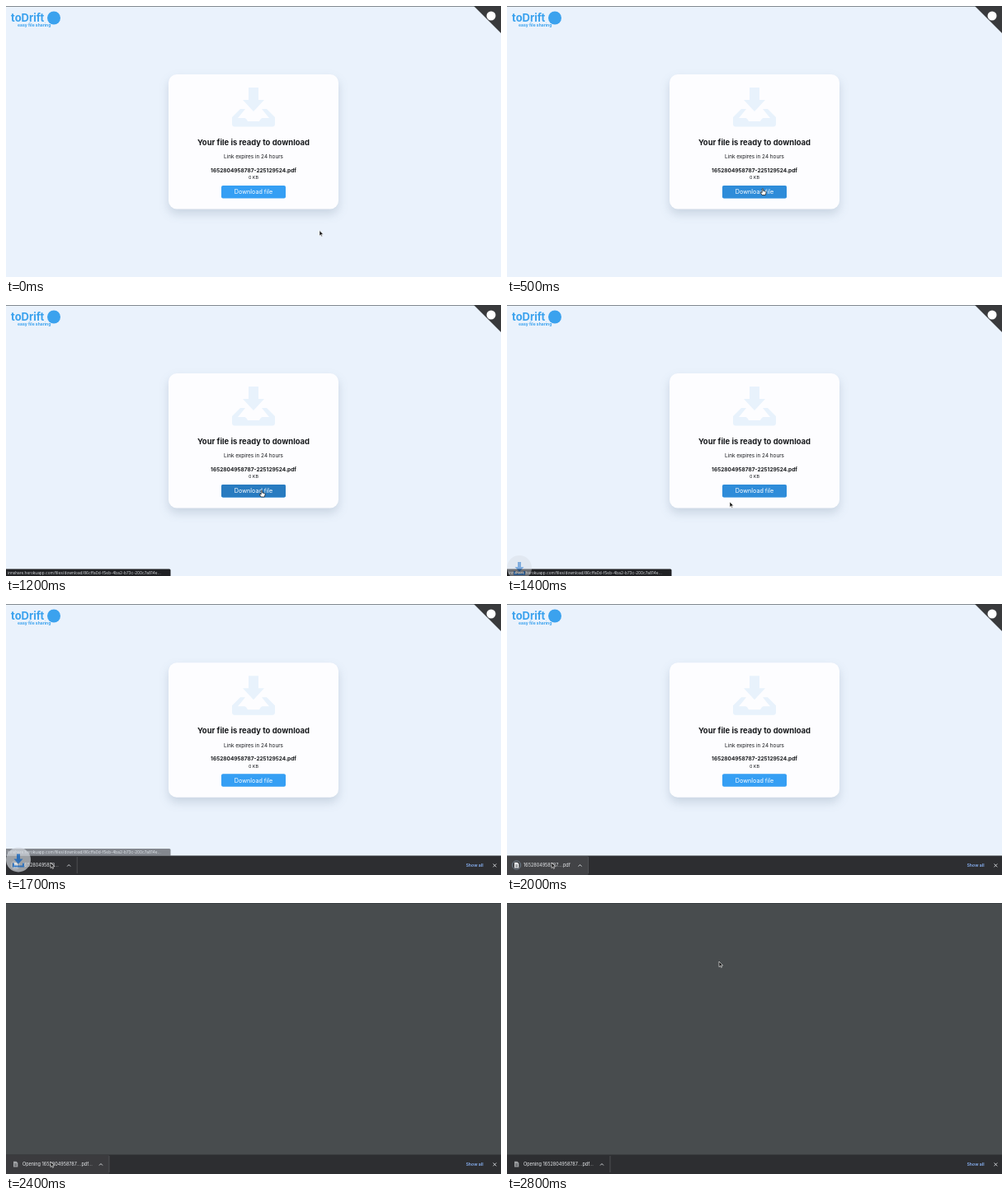
An HTML page that plays this animation: 600 by 329 pixels, repeating every 2.9 s.

```html
<!DOCTYPE html>
<html lang="en">
<head>
<meta charset="utf-8">
<title>File download</title>
<style>
  html, body { margin: 0; height: 100%; overflow: hidden; }
  svg { display: block; width: 100vw; height: 100vh; font-family: Inter, sans-serif; }
  .mid { text-anchor: middle; }
  .bold { font-weight: 700; }
  .card { filter: drop-shadow(0 6px 6px rgba(40, 70, 100, .17)); }
  .line { fill: none; stroke: #dfe1e5; stroke-width: .9; }
</style>
</head>
<body>
<svg viewBox="0 0 600 329">
  <g id="page">
    <rect width="600" height="329" fill="#eaf2fc"/>
    <g fill="#3ba2ee" class="bold">
      <text x="6" y="19" font-size="13">toDrift</text>
      <circle cx="58" cy="14.5" r="8"/>
      <text x="14" y="24.5" font-size="5">easy file sharing</text>
    </g>
    <path d="M567 0H600V33Z" fill="#393a3c"/>
    <circle cx="588" cy="12" r="5.5" fill="#fff"/>
    <g id="card" class="mid" fill="#17191c">
      <rect class="card" x="197" y="83" width="206" height="163.5" rx="10" fill="#fdfdff"/>
      <g fill="#e8f2fc">
        <path d="M294 99H306V114H313L300 128 287 114H294Z"/>
        <path d="M284 125H290L281 136H289Q291 136 293 140H307Q309 136 311 136H319L310 125H316L326 135V143Q326 146.500 323 146.500H277Q274 146.500 274 143V135Z"/>
      </g>
      <text class="bold" x="300" y="168.500" font-size="9.450">Your file is ready to download</text>
      <text x="300" y="185.300" font-size="6.400">Link expires in 24 hours</text>
      <text class="bold" x="300" y="202" font-size="6.500">1652804958787-225129524.pdf</text>
      <text x="300" y="210.300" font-size="5.400">0 KB</text>
      <rect x="261" y="218" width="78" height="15.500" rx="2" fill="#359ff4"/>
      <rect id="hover" x="261" y="218" width="78" height="15.500" rx="2" fill="#287bc0"/>
      <text x="300" y="228.400" font-size="7.200" fill="#fff">Download file</text>
    </g>
  </g>
  <rect id="blank" width="600" height="329" fill="#484c4e"/>
  <rect width="600" height="1" fill="#30353a" opacity=".55"/>
  <g id="status">
    <path d="M0 320.500H198Q199.500 320.500 199.500 322V329H0Z" fill="#202124"/>
    <text x="2" y="326.500" font-size="4.750" fill="#d5d8dc">innshare.herokuapp.com/files/download/86cffa0d-f5eb-4ba2-b73c-200c7a814e...</text>
  </g>
  <g id="shelf">
    <rect y="305.500" width="600" height="24" fill="#2d2e31"/>
    <rect id="item" y="306" height="23" fill="#424346"/>
    <path id="divider" d="M0 307V327" stroke="#56585b" stroke-width=".8"/>
    <circle id="ring" cx="11.500" cy="317" r="5.200" fill="none" stroke="#71808f" stroke-width=".9"/>
    <g id="doc">
      <path d="M9 313.700H12.500L14.300 315.500V320.500H9Z" fill="#e8eaed"/>
      <path d="M10.200 317H13M10.200 318.800H13" stroke="#3b3d40" stroke-width=".7"/>
    </g>
    <text id="label" x="20" y="319.300" font-size="5.500" fill="#e8eaed"></text>
    <path id="chevron" class="line" d="M-2 318.500L0 316.500 2 318.500"/>
    <text x="557.500" y="319" font-size="5.200" font-weight="600" fill="#8ab4f8">Show all</text>
    <path class="line" d="M590.500 315.500L594.300 319.300M594.300 315.500L590.500 319.300"/>
  </g>
  <g id="badge">
    <circle r="15" fill="#d5dbe2" opacity=".75"/>
    <path d="M-2 -7H2V-1H5.500L0 5-5.500 -1H-2ZM-7 4H-5V7H5V4H7V9H-7Z" fill="#2f78c8"/>
  </g>
  <g id="cursor" stroke-linejoin="round">
    <path id="arrow" d="M0 0V6.600L1.500 5.200 2.500 7.400 3.500 7 2.500 4.800H4.600Z" fill="#111" stroke="#fff" stroke-width=".6"/>
    <path id="hand" d="M-.8 .6Q0 -.6 .7 .6V3L3.500 3.600Q4.300 4 4 5.300L3.300 8H-.8L-2.800 5Q-2.600 4 -.8 5Z" fill="#fff" stroke="#111" stroke-width=".7"/>
  </g>
</svg>
<script>
const LOOP = 2900, STEP = 100, SHELF = 23.5;
const NAME = '1652804958787';
// time, x, y
const PATH = [[0, 380, 272.5], [500, 310, 221.5], [700, 310, 225], [1300, 310, 225],
  [1700, 54, 314], [2500, 54, 314], [2800, 257, 71]];

const $ = id => document.getElementById(id);
const ramp = (t, from, to) => Math.min(1, Math.max(0, (t - from) / (to - from)));
const smooth = u => u * u * (3 - 2 * u);
const move = (id, x, y) => $(id).setAttribute('transform', `translate(${x} ${y})`);
const fade = (id, opacity) => $(id).setAttribute('opacity', opacity);

function cursorAt(t) {
  const i = Math.max(1, PATH.findIndex(p => p[0] >= t));
  const [a, b] = t >= 2800 ? [PATH[6], PATH[6]] : [PATH[i - 1], PATH[i]];
  const u = smooth(ramp(t, a[0], b[0] + 1e-6));
  return [a[1] + (b[1] - a[1]) * u, a[2] + (b[2] - a[2]) * u];
}

function draw(t) {
  const opened = t >= 2400;
  const lift = SHELF * ramp(t, 1400, 1500);
  const [x, y] = cursorAt(t);

  fade('blank', +opened);
  move('card', 0, -lift / 2);
  fade('hover', ramp(t, 300, 700) * (1 - ramp(t, 1300, 1500)));
  move('status', 0, -lift);
  fade('status', ramp(t, 700, 900) * (1 - ramp(t, 1600, 1800) * 1.1) > 0
    ? ramp(t, 700, 900) * (1 - ramp(t, 1600, 1800)) : 0);

  // download shelf
  const grow = 1 - (1 - ramp(t, 1500, 1900)) ** 3;
  const width = opened ? 125 : 98.5 * grow;
  const digits = Math.max(0, Math.floor((width - 44) / 3.4));
  move('shelf', 0, SHELF - lift);
  fade('shelf', +(lift > 0));
  $('item').setAttribute('width', width);
  fade('item', t >= 1800 && y > 306 ? (opened ? .65 : 1) : 0);
  move('divider', width, 0);
  move('chevron', width - 10, 0);
  fade('chevron', +(width > 30));
  $('label').textContent = opened ? `Opening ${NAME}....pdf...`
    : digits > NAME.length ? `${NAME}....pdf`
    : digits ? `${NAME.slice(0, digits)}...` : '';
  fade('ring', opened ? 0 : 1);
  fade('doc', opened ? .6 : 1);

  // falling download badge
  const fall = ramp(t, 1300, 1900);
  move('badge', 15, 329 - lift - 30 * (1 - fall) + 15);
  fade('badge', 1 - 4 * (fall - .5) ** 2);

  const pointing = t >= 400 && t < 1400;
  move('cursor', x, y);
  fade('arrow', +!pointing);
  fade('hand', +pointing);
}

function tick() {
  const t = performance.now() % LOOP;
  draw(Math.floor(t / STEP) * STEP);
  requestAnimationFrame(tick);
}
tick();
</script>
</body>
</html>
```
